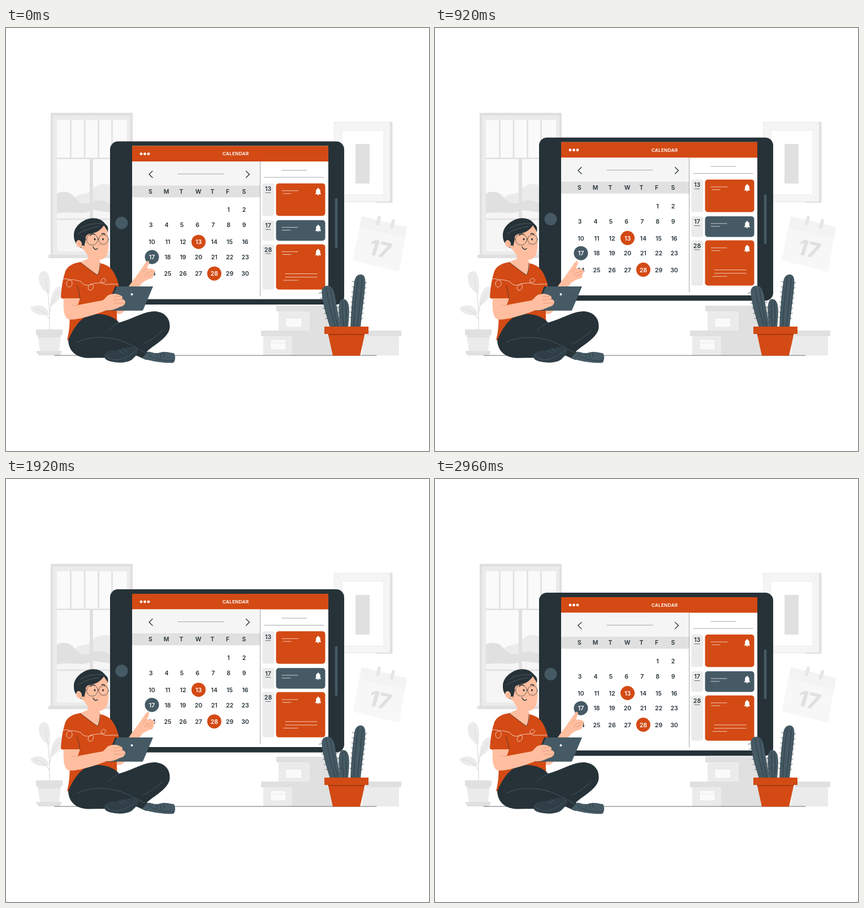
Animation, 748 px wide and 748 px high, one loop 3 s. Source, as an HTML page:

```html
<!DOCTYPE html>
<html lang="en">
<head>
<meta charset="utf-8">
<title>Calendar</title>
<style>
html, body { margin: 0; width: 100%; height: 100%; overflow: hidden; background: #fff; }
svg { display: block; width: 100vw; height: 100vh; }
text { font: 600 10.5px Inter, "Open Sans", sans-serif; text-anchor: middle; fill: #263238; }
.o { fill: #d34a14; }
.d { fill: #263238; }
.s { fill: #455a64; }
.k { fill: #ffbe9f; }
.w { fill: #fff; }
.g1 { fill: #fafafa; }
.g2 { fill: #f5f5f5; }
.g3 { fill: #ebebeb; }
.g4 { fill: #e0e0e0; }
.l { fill: none; stroke: #263238; stroke-width: .7; stroke-linecap: round; stroke-linejoin: round; }
.lw { stroke: #fff; }
.lk { stroke: #d98d70; }
.lg { stroke: #e0e0e0; stroke-width: 2.6; stroke-linecap: butt; }
</style>
</head>
<body>
<svg viewBox="0 0 748 748">
<defs>
  <path id="bell" class="w" d="M0-6.5C-1-6.5-1.2-5.5-1-5-3-4.5-3.8-3-3.8-1V2L-5 4V4.8H5V4L3.8 2V-1C3.8-3 3-4.5 1-5 1.2-5.5 1-6.5 0-6.5ZM-1.5 5.3H1.5C1.3 7-1.3 7-1.5 5.3Z"/>
</defs>

<!-- window -->
<path class="g4" d="M79 150H224V405H79Z"/>
<path class="g3" d="M83 155H220V401H83Z"/>
<path class="g1" d="M90 163H214V395H90Z"/>
<path class="g3" d="M90 318 122 300C134 289 143 298 153 285 163 275 178 272 190 282L214 296V338H90Z"/>
<path class="g4" d="M90 293C101 286 114 290 121 299 132 312 141 311 148 309 162 303 174 303 186 312V338H154V322C134 332 118 323 90 328Z"/>
<path class="g2" d="M90 328C118 323 134 332 154 322L186 326V395H90Z"/>
<path class="l lg" d="M114.500 163V230M139 163V230M163.500 163V230M187.500 163V230M90 230.500H214M90 338H214"/>
<path class="g4" d="M148 231H154V395H148Z"/>
<path class="g4" d="M75 401H230V407H75Z"/>

<!-- pale plant -->
<path class="g3" d="M77 470C65 466 57 452 58 441 58 433 65 427 71 431 79 437 79 456 77 470ZM78 493C79 477 82 464 91 458 97 455 100 460 99 466 98 479 88 486 78 493ZM76 506C66 510 47 507 43 495 55 487 71 489 76 506Z"/>
<path class="l" style="stroke:#e0e0e0;stroke-width:1.4" d="M69 442Q78 475 77 533M94 466Q79 483 77.500 502M50 496Q70 500 77 516"/>
<path class="g3" d="M56 543H97L94 571H60Z"/>
<path class="g4" d="M53 533H100V543H53ZM56 543H97L96.500 547H56.500ZM54 571H98V574L95 579H58L54 574Z"/>

<!-- picture -->
<path class="g2" d="M580 166H683V309H580Z"/>
<path class="g4" d="M679 166H683.500V309H655V307H679Z"/>
<path class="w" d="M594 181H668V295H594Z"/>
<path class="l" style="stroke:#e6e6e6" d="M580.500 307V166.500H679L668 181H594V295H668V181M580.500 166.500 594 181M594 295 581 307H679L668 295"/>
<path class="g4" d="M618 205H643V275H618Z"/>

<!-- wall calendar -->
<path style="fill:#f7f7f7" d="M629 333 709 352 695 431 613 411Z"/>
<path style="fill:#f3f3f3" d="M629 333 709 352 706 372 625 353Z"/>
<path class="l" style="stroke:#e6e6e6;stroke-width:6" d="M660 335 657 346M685 341 682 352"/>
<text transform="translate(657.500 404) rotate(13) skewX(-4)" style="font-size:38px;font-weight:800;fill:#e0e0e0">17</text>

<!-- boxes -->
<path class="g3" d="M482 501H590V535H482ZM455 545H590V579H455ZM630 545H695V579H630Z"/>
<path class="g4" d="M478 491H590V501H478ZM537 501H590V535H537ZM451 535H590V545H451ZM506 545H590V579H506ZM636 535H699V545H636Z"/>
<path class="g1" d="M495 513H523V529H495ZM468 551H495V569H468Z"/>
<path class="l" style="stroke:#e0e0e0" d="M495 513H523V529H495ZM468 551H495V569H468ZM468 557H495"/>
<path class="l" d="M86 579H655"/>

<!-- big tablet, moved as one group -->
<g id="tablet">
  <rect class="d" x="184" y="200.500" width="414" height="288.500" rx="14"/>
  <path class="w" d="M223 208.500H570V479.500H223Z"/>
  <path class="o" d="M223 208.500H570V236H223Z"/>
  <path class="g2" d="M223 236H449.500V278.500H223Z"/>
  <path class="g4" d="M223 278.500H449.500V299.500H223Z"/>
  <circle class="s" cx="204.500" cy="344.700" r="11"/>
  <rect class="s" x="581.700" y="301" width="4.600" height="88" rx="2"/>
  <path class="l" style="stroke:#7d8488" d="M449.500 236V474M304 258H385M488 251.500H532M457 264H562"/>
  <path class="l" style="stroke-width:1.300" d="M259 253 253 258.700 259 264.500M424.500 253 430.500 258.700 424.500 264.500"/>
  <g class="w"><circle cx="239" cy="222.500" r="2.400"/><circle cx="245.500" cy="222.500" r="2.400"/><circle cx="252" cy="222.500" r="2.400"/></g>
  <text x="406" y="225.300" style="font-size:8.200px;letter-spacing:.25px;fill:#fff">CALENDAR</text>
  <g id="days"></g>
  <g id="cards"></g>
  <path class="l lw" d="M488 287.700H517M490 292.700H504M488 352.500H516M488 357.500H503M488 395.500H516M489 400.500H504M494 434.500H550M494 440.500H550M491 446H516"/>
</g>

<!-- cactus -->
<g class="s">
  <path d="M573 530C566 507 560 488 558.500 470 557 460 563 455 570 456 579 457 581 468 583 481 586 501 590 515 591 530Z"/>
  <path d="M609 530C610 500 613 470 616 448 618 437 625 435 629 436 636 438 636 447 635 457 633 481 629 505 627 530Z"/>
  <path d="M591 530C588 505 587 488 592 481 597 477 604 480 606 490 608 501 606 516 605 530Z"/>
</g>
<path class="l" d="M566 460Q572 495 582 528M574 460Q578 495 587 528M623 440Q616 490 615 528M630 442Q626 490 621 528M595 483Q594 505 597 528M600 482Q603 505 601 528"/>
<path class="l" id="spines"/>
<path class="o" d="M563 528H641V541H634.500L626 579.500H578L569.500 541H563Z"/>
<path style="fill:#a93b10" d="M569.500 541H634.500L634 543H570Z"/>

<!-- raised arm -->
<path class="k" d="M187 497 215 460C222 449 231 439 235 432 241 424 246 415 250 412 254 411 254 416 249 425 254 425 261 426 264 430 260 434 262 440 258 443 253 443 248 446 243 449 232 459 219 480 208 502 200 509 190 506 187 497Z"/>
<path class="l lk" d="M248 425 242 432M259 430 248 434 246 439M258 435 250 439"/>

<!-- neck and shirt -->
<path class="o" d="M131 414C118 416 109 421 105 430 100 445 98 460 97 477 103 480 108 480 111 480 111 500 116 520 108 552L200 535C193 510 196 490 201 462 198 447 193 432 184 424 180 420 173 417 166 416Z"/>
<path class="k" d="M144 392 145 408 131 414C141 421 152 430 162 437 165 431 167 421 167 415L163 405Z"/>
<path class="l" d="M131 414Q151 430 162 437 166 429 166 416"/>
<path class="l lw" d="M99 444C108 442 118 445 117 452 116 460 107 460 107 452 108 441 124 446 132 448 137 456 145 456 152 453 157 455 154 464 148 464 142 462 146 452 155 452 165 450 178 452 176 445 174 440 167 444 168 449 172 456 185 452 198 453"/>
<path class="l" d="M126 456Q130 468 131 480"/>

<!-- head -->
<path class="d" d="M138 391C126 387 120 378 120 368 119 355 128 345 141 339 152 334 168 335 176 347 181 351 181 355 180 360L146 380Z"/>
<path class="k" d="M179 358 181 374C182 392 180 406 170 409 160 412 148 408 142 399L138 387 141 374C140 368 143 365 148 364 159 363 168 357 173 349Z"/>
<ellipse class="k" cx="129" cy="381.500" rx="5" ry="6.500" transform="rotate(-15 129 381.500)"/>
<path class="k" d="M131 386 137 384 143 400 139 394Z"/>
<path class="l" style="stroke:#73848b;stroke-width:.5" d="M132 354Q147 344 171 346M127 364Q143 354 165 351"/>
<g class="l"><circle cx="152.500" cy="374" r="10"/><circle cx="172.500" cy="374" r="8.500"/><path d="M162.500 373H164M142.500 373 131 375"/></g>
<path class="l" style="stroke-width:1.400" d="M149 367Q152 363 157 365M169 364Q172 362 175 365M154 387Q157 394 162 390"/>
<path class="l lk" d="M164 374 167 383 163 384M127 379Q131 380 130 385"/>
<ellipse class="d" cx="157" cy="373.500" rx="1.400" ry="2"/><ellipse class="d" cx="171.500" cy="373.500" rx="1.400" ry="2"/>

<!-- legs and shoes -->
<path class="d" d="M110 552C117 536 131 508 155 506 180 504 194 514 200 521 225 514 244 501 263 501 284 502 292 518 289 533 285 549 261 561 249 572L259 580 248 587 228 578C205 584 180 583 148 583.500 126 584 111 573 110 552Z"/>
<path class="l" style="stroke:#53666f" d="M126 556Q152 542 193 550 215 555 246 574M200 521Q189 526 181 535M277 535Q260 551 242 559"/>
<path class="s" d="M250 573C256 571 262 577 272 574 281 571 290 574 297 575 300 580 300 588 296 592 280 593 260 590 240 584Z"/>
<path class="l" d="M252 577Q265 590 297 588M266 576 269 583M272 575 275 583M278 574 280 581"/>
<path style="fill:#303f47" d="M174 580C174 573 185 570 195 570 210 566 225 561 232 566 238 572 230 580 222 587 210 594 190 592 180 588 176 586 174 584 174 580Z"/>
<path class="l" style="stroke:#53666f" d="M176 579Q188 592 208 584 221 579 232 568M199 570 208 575M206 567 214 573"/>

<!-- hand-held tablet and left arm -->
<path class="d" d="M193 457H259L240 499.500H176Z"/>
<path class="s" d="M196 457H260L242 499.500H178Z"/>
<circle class="w" cx="222.500" cy="471" r="2"/>
<path class="k" d="M102 478C101 495 102 508 108 514 116 520 155 508 178 499 187 500 193 497 202 493 208 492 211 488 211 484 210 481 208 480 205 479 207 477 206 474 203 473 195 468 185 470 180 473 175 477 174 481 169 482 154 485 140 487 127 490L131 478Z"/>
<path class="l lk" d="M203 474 190 476M207 480 190 481M209 486 191 487M127 490Q120 492 117 490"/>
</svg>
<script>
const $ = id => document.getElementById(id);
const label = (x, y, s, fill = "#263238") => `<text x="${x}" y="${y + 3.8}" style="fill:${fill}">${s}</text>`;

const cols = [258, 286, 313, 340.5, 368.3, 395.5, 423];
const rows = [321.5, 348.5, 378.5, 405.3, 434.5];
const marked = { 13: "o", 17: "s", 28: "o" };
let days = [..."SMTWTFS"].map((c, i) => label([255.5, 283.5, 310, 340, 365, 392, 421][i], 289, c)).join("");
for (let n = 1; n <= 30; n++) {
  const cell = n + 4, x = cols[cell % 7] - (n < 10 ? 2 : 0), y = rows[cell / 7 | 0];
  if (marked[n]) days += `<circle class="${marked[n]}" cx="${x}" cy="${y - .4}" r="12.5"/>`;
  days += label(x, y, n, marked[n] && "#fff");
}
$("days").innerHTML = days;

$("cards").innerHTML = [[13, 274.7, 57.5], [17, 339.7, 36.5], [28, 382.3, 80]].map(([n, y, h]) =>
  `<rect class="g3" x="453.500" y="${y}" width="20.500" height="${h}" rx="4"/>
   <rect class="${marked[n]}" x="477.500" y="${y}" width="87" height="${h}" rx="5"/>
   ${label(463.5, y + 9.5, n)}<path class="l" d="M459 ${y + 16.5}H468"/>
   <use href="#bell" x="552" y="${y + 14.5}"/>`).join("");

let spines = "";
for (let i = 0; i < 8; i++) {
  const y = 450 + i * 9, x = 615.5 - i * .7, u = 635 - i;
  spines += `M${x + 1} ${y}l-4-2M${u - 1} ${y + 2}l4-2`;
  if (i > 1) spines += `M${553 + i * 2.3} ${y}l-4 1M${576 + i * 1.9} ${y}l4-2`;
}
$("spines").setAttribute("d", spines);

// Linear rise and fall, 1.5 s per cycle
function draw(now) {
  const phase = (now + 30) % 1500 / 750;
  const lift = 9.9 * (1 - Math.abs(1 - phase));
  $("tablet").setAttribute("transform", `translate(0 ${.5 - lift})`);
  requestAnimationFrame(draw);
}
draw(0);
</script>
</body>
</html>
```
